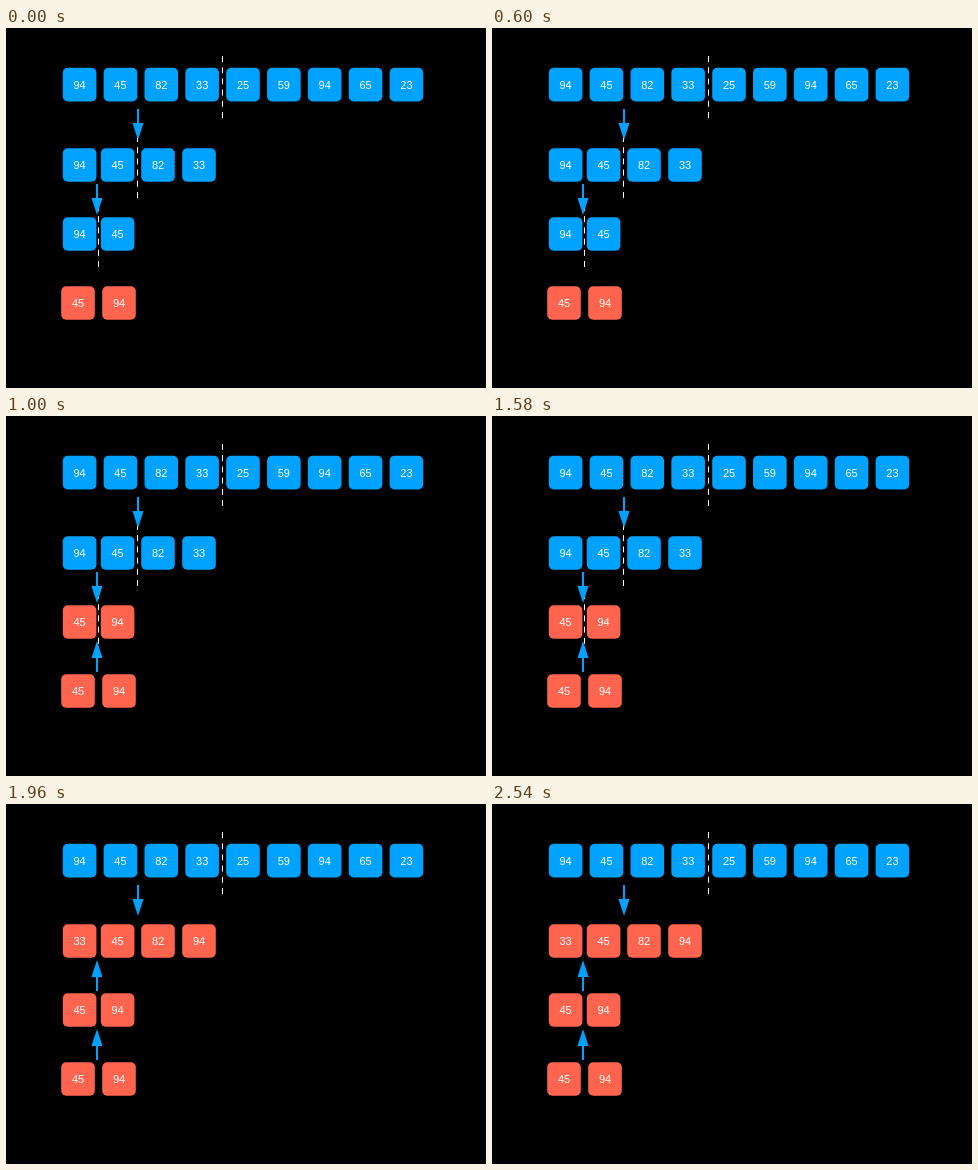
These frames come from a looping animation (480 by 360 pixels, 2.92 s). An HTML page with a canvas:

```html
<!DOCTYPE html>
<html lang="en">
<head>
<meta charset="utf-8">
<title>Merge sort</title>
<style>
  html, body { margin: 0; width: 100%; height: 100%; overflow: hidden; background: #000; }
  canvas { display: block; width: 480px; height: 360px; }
</style>
</head>
<body>
<canvas id="stage" width="480" height="360"></canvas>
<script>
const ctx = document.getElementById('stage').getContext('2d');
const BLUE = '#00a2ff', RED = '#ff644e', WHITE = '#fff';
const LOOP = 2920, MERGE_PAIR = 1000, MERGE_FOUR = 1960;

const rows = [
  { y: 39.8, xs: Array.from({ length: 9 }, (_, i) => 56.8 + i * 40.85) },
  { y: 120.2, xs: [56.8, 94.8, 135.2, 176.2] },
  { y: 189.2, xs: [56.8, 94.8] },
  { y: 258.2, xs: [55.2, 96.2] }
];

function drawRow({ y, xs }, values, color) {
  const size = 33.6;
  xs.forEach((x, i) => {
    ctx.fillStyle = color;
    ctx.beginPath();
    ctx.roundRect(x, y, size, size, 5);
    ctx.fill();
    ctx.fillStyle = WHITE;
    ctx.fillText(values[i], x + size / 2, y + 21);
  });
}

function drawSplit(x, top) {
  ctx.fillStyle = WHITE;
  for (let i = 0; i < 6; i++) ctx.fillRect(x, top + i * 11.2, 1, 6);
}

function drawArrow(x, tail, tip) {
  const base = tip + 17 * Math.sign(tail - tip);
  ctx.fillStyle = BLUE;
  ctx.fillRect(x - 1, Math.min(tail, base), 2, Math.abs(tail - base));
  ctx.beginPath();
  ctx.moveTo(x, tip);
  ctx.lineTo(x - 5.5, base);
  ctx.lineTo(x + 5.5, base);
  ctx.fill();
}

function draw(time) {
  const pairDone = time >= MERGE_PAIR;
  const fourDone = time >= MERGE_FOUR;

  ctx.fillStyle = '#000';
  ctx.fillRect(0, 0, 480, 360);
  ctx.font = '11px "Liberation Sans", Arial, sans-serif';
  ctx.textAlign = 'center';

  drawRow(rows[0], [94, 45, 82, 33, 25, 59, 94, 65, 23], BLUE);
  drawRow(rows[1], fourDone ? [33, 45, 82, 94] : [94, 45, 82, 33], fourDone ? RED : BLUE);
  drawRow(rows[2], pairDone ? [45, 94] : [94, 45], pairDone ? RED : BLUE);
  drawRow(rows[3], [45, 94], RED);

  drawSplit(216, 28);
  if (!fourDone) {
    drawSplit(131, 108);
    drawSplit(92, 177);
  }

  drawArrow(132, 81, 112);
  if (fourDone) drawArrow(91, 187, 156);
  else drawArrow(91, 156, 187);
  if (pairDone) drawArrow(91, 256, 225);
}

const start = performance.now();
function tick() {
  draw((performance.now() - start) % LOOP);
  requestAnimationFrame(tick);
}
tick();
</script>
</body>
</html>
```
